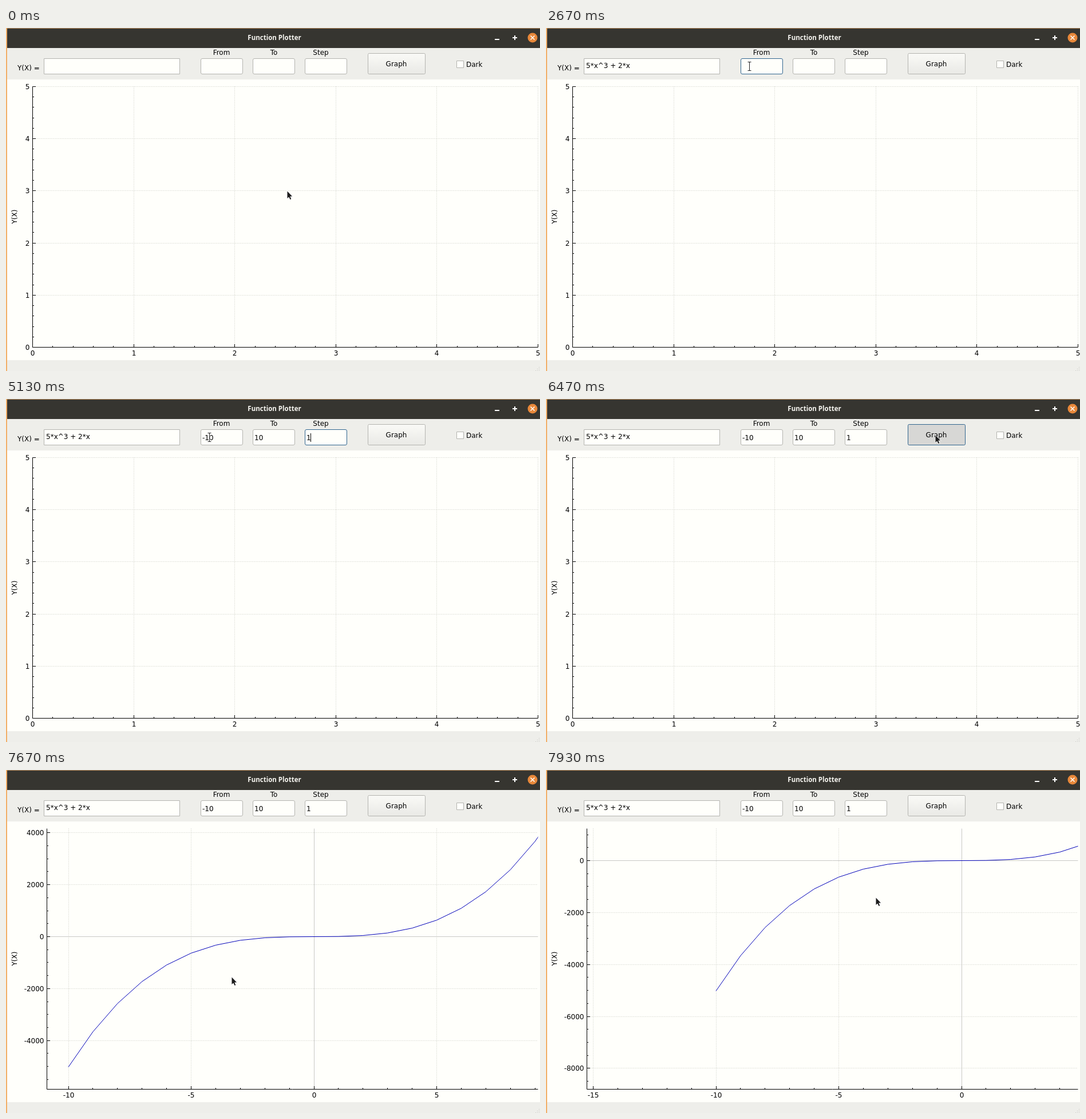
Animation, 933 px wide and 600 px high, one loop 8000 ms. Source, as an HTML page with a canvas:

```html
<!DOCTYPE html>
<html lang="en">
<head>
<meta charset="utf-8">
<title>Function Plotter</title>
<style>
html, body { margin: 0; width: 100%; height: 100%; overflow: hidden; }
canvas { display: block; }
</style>
</head>
<body>
<canvas id="stage" width="933" height="600"></canvas>
<script>
const ctx = document.getElementById('stage').getContext('2d');
const LOOP = 8000, PLOTTED = 6530;
const UI_FONT = '12px "DejaVu Sans", sans-serif';
const PAPER = '#fffffb', PANEL = '#eeeeea', EDGE = '#b4b4b0', FOCUS = '#30658f';
const BUTTON = 4;

// Every track is a list of [start time, ...values], held until the next entry.
const fields = [
  { x: 66, w: 238, pad: 4, base: 70, radius: 0, text: [[0, ''], [1270, '5*x^3 + 2*x']] },
  { x: 340, w: 74, pad: 3, base: 72, radius: 2.5, text: [[0, ''], [2730, '-'], [3070, '-1'], [3330, '-10']] },
  { x: 431, w: 74, pad: 3, base: 72, radius: 2.5, text: [[0, ''], [4600, '1'], [4800, '10']] },
  { x: 522, w: 74, pad: 3, base: 72, radius: 2.5, text: [[0, ''], [5130, '1']] }
];
// focused widget, caret visible
const focusTrack = [
  [0, -1, 0], [930, 0, 1], [1530, 0, 0], [2070, 1, 1], [2670, 1, 0], [2730, 1, 1],
  [3670, 2, 1], [4470, 2, 0], [4600, 2, 1], [4930, 3, 1], [5800, 3, 0],
  [6470, BUTTON, 0], [7400, -1, 0]
];
// shape, x, y
const pointerTrack = [
  [0, 'arrow', 491, 285], [270, 'arrow', 458, 264], [400, 'arrow', 345, 188],
  [600, 'arrow', 302, 152], [730, 'arrow', 236, 100], [800, 'beam', 196, 68],
  [1530, 'beam', 214, 69], [1670, 'beam', 272, 70], [1730, 'arrow', 326, 67],
  [1800, 'arrow', 335, 66], [1930, 'beam', 346, 66], [2070, 'beam', 355, 67],
  [5530, 'none', 0, 0], [5930, 'arrow', 584, 138], [6070, 'arrow', 626, 114],
  [6130, 'arrow', 648, 92], [6200, 'arrow', 664, 76], [6330, 'arrow', 673, 66],
  [6470, 'arrow', 680, 63], [7070, 'arrow', 674, 76], [7130, 'arrow', 638, 114],
  [7200, 'arrow', 560, 196], [7270, 'arrow', 470, 292], [7330, 'arrow', 398, 362],
  [7400, 'arrow', 356, 397], [7600, 'arrow', 365, 390], [7670, 'arrow', 394, 362],
  [7730, 'arrow', 440, 326], [7800, 'arrow', 492, 286], [7870, 'arrow', 540, 249],
  [7930, 'arrow', 576, 223]
];
// how far the plot has been dragged
const dragTrack = [
  [0, 0, 0], [7600, 10.5, -9], [7670, 37.5, -39], [7730, 86.5, -73],
  [7800, 138.5, -112], [7870, 188.5, -148], [7930, 225.5, -172]
];

const at = (track, t) => track.findLast(step => step[0] <= t).slice(1);
const snap = v => Math.floor(v) + 0.5;

function fill(color, x, y, w, h) {
  ctx.fillStyle = color;
  ctx.fillRect(x, y, w, h);
}

function text(str, x, y, align = 'left', color = '#000', font = UI_FONT) {
  ctx.font = font;
  ctx.textAlign = align;
  ctx.fillStyle = color;
  ctx.fillText(str, x, y);
}

function line(color, width, ...points) {
  ctx.strokeStyle = color;
  ctx.lineWidth = width;
  ctx.beginPath();
  for (let i = 0; i < points.length; i += 2) ctx.lineTo(points[i], points[i + 1]);
  ctx.stroke();
}

function box(x, y, w, h, radius, paint, edge) {
  ctx.beginPath();
  ctx.roundRect(x + 0.5, y + 0.5, w - 1, h - 1, radius);
  ctx.fillStyle = paint;
  ctx.fill();
  ctx.strokeStyle = edge;
  ctx.lineWidth = 1;
  ctx.stroke();
}

function drawTitleBar() {
  fill('#363530', 0, 0, 933, 35);
  fill('#b98e5f', 0, 0, 933, 1);
  text('Function Plotter', 469, 21, 'center', '#f8f7f2', 'bold 11.5px "Open Sans", sans-serif');
  line('#fff', 2, 854, 20, 862, 20);
  line('#fff', 2, 885, 17, 893, 17);
  line('#fff', 2, 889, 13, 889, 21);
  ctx.fillStyle = '#e8883a';
  ctx.beginPath();
  ctx.arc(920, 17, 8.5, 0, 7);
  ctx.fill();
  line('#fff', 1.5, 916.5, 13.5, 923.5, 20.5);
  line('#fff', 1.5, 923.5, 13.5, 916.5, 20.5);
}

function drawToolbar(t) {
  const [focus, caret] = at(focusTrack, t);
  text('Y(X) =', 20, 74);
  text('From', 376.5, 47, 'center');
  text('To', 468, 47, 'center');
  text('Step', 550, 47, 'center');

  fields.forEach((f, i) => {
    const value = at(f.text, t)[0];
    box(f.x, 53, f.w, 28, f.radius, PAPER, i && i === focus ? FOCUS : EDGE);
    text(value, f.x + f.pad, f.base);
    if (i === focus && caret) {
      const x = snap(f.x + f.pad + ctx.measureText(value).width);
      line('#000', 1, x, f.base - 12, x, f.base + 3);
    }
  });

  const shade = ctx.createLinearGradient(0, 44, 0, 81);
  shade.addColorStop(0, '#fafaf7');
  shade.addColorStop(1, '#e9e9e5');
  const pressed = focus === BUTTON && t < PLOTTED;
  box(632, 44, 101, 37, 2, pressed ? '#d7d7d5' : shade, focus === BUTTON ? FOCUS : EDGE);
  text('Graph', 682, 67, 'center');
  box(787, 57, 13, 13, 0, PAPER, EDGE);
  text('Dark', 804, 68);
}

function drawPlot(t) {
  const plotted = t >= PLOTTED;
  const [dx, dy] = at(dragTrack, t);
  const left = plotted ? 71.5 : 46.5, right = 929.5, top = 102.5, bottom = 558.5;
  const view = plotted
    ? { x0: -10, xSpan: 20, y0: -5020, ySpan: 10040, xStep: 5, yStep: 2000, yMinor: 4 }
    : { x0: 0, xSpan: 5, y0: 0, ySpan: 5, xStep: 1, yStep: 1, yMinor: 5 };
  const px = x => left + (x - view.x0) / view.xSpan * (right - left) + dx;
  const py = y => bottom - (y - view.y0) / view.ySpan * (bottom - top) + dy;

  function axis(step, minor, toPixel, low, high, draw) {
    for (let i = -10 * minor; i <= 10 * minor; i++) {
      const p = toPixel(i * step / minor);
      if (p > low - 0.5 && p < high + 0.5) draw(snap(p), i % minor === 0, i * step / minor);
    }
  }
  function gridLine(value, ...ends) {
    ctx.setLineDash(value === 0 ? [] : [1, 2]);
    line(value === 0 ? '#c8c8c6' : '#c6c8c0', 1, ...ends);
    ctx.setLineDash([]);
  }

  axis(view.xStep, 5, px, left, right, (x, major, value) => {
    if (major) {
      gridLine(value, x, top, x, bottom);
      text(value, x, 573, 'center');
    }
    line('#000', 1, x, bottom, x, bottom - (major ? 5.5 : 2.5));
  });
  axis(view.yStep, view.yMinor, py, top, bottom, (y, major, value) => {
    if (major) {
      gridLine(value, left, y, right, y);
      text(value, left - 5, y + 4.5, 'right');
    }
    line('#000', 1, left, y, left + (major ? 5.5 : 2.5), y);
  });
  line('#000', 1, left, top, left, bottom, right, bottom);

  ctx.save();
  ctx.translate(19, 330);
  ctx.rotate(-Math.PI / 2);
  text('Y(X)', 0, 0, 'center');
  ctx.restore();

  if (!plotted) return;
  ctx.save();
  ctx.beginPath();
  ctx.rect(left, top, right - left, bottom - top);
  ctx.clip();
  const curve = [];
  for (let x = -10; x <= 10; x++) curve.push(px(x), py(5 * x ** 3 + 2 * x));
  line('#0000b8', 1, ...curve);
  ctx.restore();
}

function drawPointer(t) {
  const [shape, x, y] = at(pointerTrack, t);
  ctx.save();
  ctx.translate(x + 0.5, y);
  if (shape === 'beam') {
    for (const [color, width] of [['#fff', 2.5], ['#222', 1]]) {
      line(color, width, 0, -7, 0, 7);
      line(color, width, -3, -7.5, 3, -7.5);
      line(color, width, -3, 7.5, 3, 7.5);
    }
  } else if (shape === 'arrow') {
    const outline = new Path2D('M0 0.5V13L2.8 10.4L5 15L6.8 14.2L4.8 9.5H8.6Z');
    ctx.strokeStyle = '#fff';
    ctx.lineWidth = 1.5;
    ctx.stroke(outline);
    ctx.fillStyle = '#1c1c1c';
    ctx.fill(outline);
  }
  ctx.restore();
}

function drawScene(t) {
  fill(PANEL, 0, 0, 933, 600);
  fill(PAPER, 2, 90, 931, 491);
  drawTitleBar();
  drawToolbar(t);
  drawPlot(t);
  for (let row = 0; row < 3; row++)
    for (let col = 0; col <= row; col++) fill('#c4c4c0', 931 - col * 3, 593 + row * 3, 1, 1);
  fill('#f2b06a', 0, 0, 2, 600);
  drawPointer(t);
}

function tick() {
  drawScene(performance.now() % LOOP);
  requestAnimationFrame(tick);
}
tick();
</script>
</body>
</html>
```
